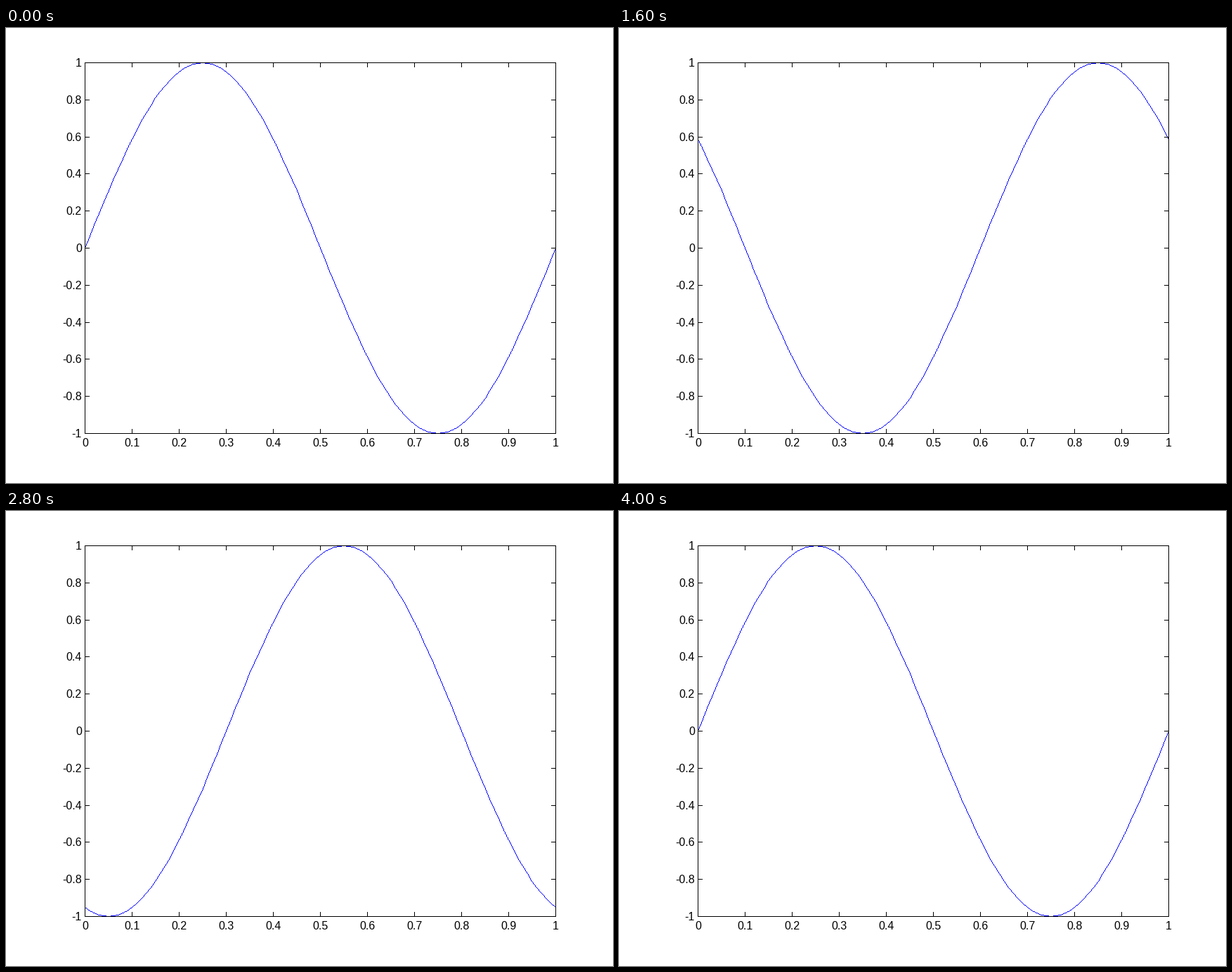
Animation, 864 px wide and 648 px high, one loop 4.2 s. Source, as a matplotlib script:

```python
import numpy as np
import matplotlib.pyplot as plt
from matplotlib.animation import FuncAnimation
from matplotlib.collections import PolyCollection
from matplotlib.patches import Rectangle

W, H, DPI = 864, 648, 72
LEFT, RIGHT, TOP, BOTTOM = 112, 782, 49, 577
TICK = 7
FRAMES, INTERVAL = 21, 200
SHIFT = 0.05  # phase advance per frame, in periods

plt.rcParams["font.family"] = "Liberation Sans"

fig = plt.figure(figsize=(W / DPI, H / DPI), dpi=DPI, facecolor="white")
ax = fig.add_axes([0, 0, 1, 1])
ax.set_xlim(0, W)
ax.set_ylim(H, 0)
ax.axis("off")


def bar(x, y, w, h):
    """Crisp black bar whose top-left pixel is (x, y)."""
    ax.add_patch(Rectangle((x, y), w, h, facecolor="black", linewidth=0,
                           antialiased=False, zorder=3))


def label(x, y, value, align):
    ax.text(x, y, f"{value:g}", fontsize=16, color="black",
            ha=align, va="baseline", zorder=4)


def draw_axes():
    for y in (TOP, BOTTOM):
        bar(LEFT, y, RIGHT - LEFT + 1, 1)
    for x in (LEFT, RIGHT):
        bar(x, TOP, 1, BOTTOM - TOP + 1)

    for i in range(11):
        x = round(LEFT + (RIGHT - LEFT) * i / 10)
        bar(x, TOP, 1, TICK)
        bar(x, BOTTOM - TICK + 1, 1, TICK)
        label(x + 0.5, BOTTOM + 19, i / 10, "center")

        y = round(TOP + (BOTTOM - TOP) * i / 10)
        bar(LEFT, y, TICK, 1)
        bar(RIGHT - TICK + 1, y, TICK, 1)
        label(108, y + 6, (5 - i) / 5, "right")


def curve_pixels(phase):
    """Pixels of a one-pixel-wide polyline along the shifted sine."""
    t = np.linspace(0, 1, 101)
    wave = np.sin(2 * np.pi * (t + phase))
    x = np.rint(LEFT + (RIGHT - LEFT) * t)
    y = np.rint((TOP + BOTTOM) / 2 - (BOTTOM - TOP) / 2 * wave)
    # Step along the longer direction of each segment.
    steps = np.maximum(np.abs(np.diff(x)), np.abs(np.diff(y)))
    dist = np.concatenate(([0], np.cumsum(steps)))
    s = np.arange(dist[-1] + 1)
    return np.rint(np.column_stack((np.interp(s, dist, x),
                                    np.interp(s, dist, y))))


UNIT = np.array([(0, 0), (1, 0), (1, 1), (0, 1)])
curve = PolyCollection([UNIT], facecolors="#0000ff", linewidths=0,
                       antialiaseds=False, zorder=2)
ax.add_collection(curve, autolim=False)
draw_axes()


def update(frame):
    pixels = curve_pixels(frame * SHIFT)
    curve.set_verts(pixels[:, None, :] + UNIT)
    return [curve]


anim = FuncAnimation(fig, update, frames=FRAMES, interval=INTERVAL,
                     repeat=True, repeat_delay=0, blit=False)
plt.show()
```
